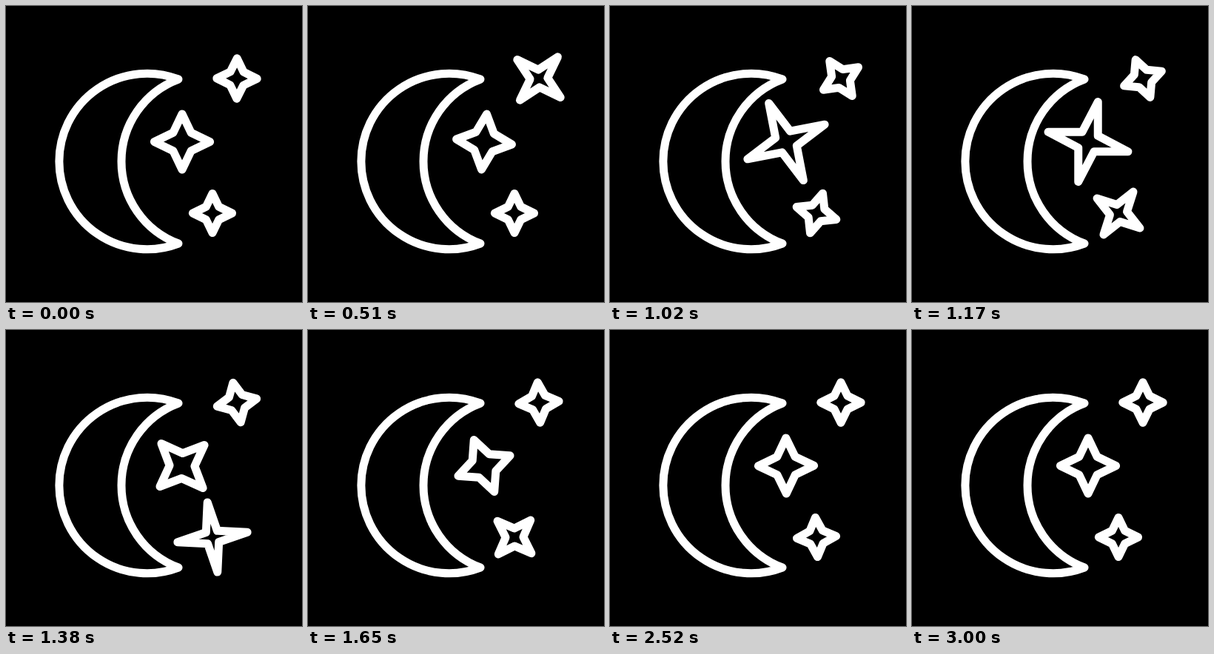
An HTML page for the animation above (5.09 s loop, 400 by 400 pixels).

```html
<!DOCTYPE html>
<html lang="en">
<head>
<meta charset="utf-8">
<title>Moon and stars</title>
<style>
  html, body { margin: 0; width: 100%; height: 100%; overflow: hidden; background: #000; }
  svg { display: block; width: 100%; height: 100%; }
  path { fill: none; stroke: #fff; stroke-width: 11; stroke-linejoin: round; stroke-linecap: round; }
</style>
</head>
<body>
<svg viewBox="0 0 400 400">
  <path d="M233 99A118.8 118.8 0 1 0 233 321A118.5 118.5 0 0 1 233 99Z"/>
  <g id="stars"></g>
</svg>
<script>
  const LOOP = 5090;
  const STRETCH = 21;
  const PEAK = 0.326;
  const SPREAD = 0.066;

  // Times in ms; tip and waist describe the resting outline.
  const stars = [
    { x: 312, y: 98, tip: 27.2, waist: 9, start: -30, length: 2130 },
    { x: 238, y: 183.5, tip: 37.6, waist: 12.2, start: 300, length: 2400 },
    { x: 279, y: 280, tip: 26.6, waist: 8.7, start: 600, length: 2400 },
  ];

  const group = document.getElementById('stars');
  for (const star of stars) {
    star.node = document.createElementNS('http://www.w3.org/2000/svg', 'path');
    group.append(star.node);
  }

  const bezier = (a, b, t) => 3 * a * t * (1 - t) ** 2 + 3 * b * t * t * (1 - t) + t ** 3;

  function ease(x) {
    let low = 0, high = 1;
    for (let i = 0; i < 24; i++) {
      const mid = (low + high) / 2;
      if (bezier(0.5, 0.1, mid) < x) low = mid;
      else high = mid;
    }
    return bezier(0.1, 1, low);
  }

  function outline(tip, waist) {
    return `M0 ${-tip}L${waist} ${-waist} ${tip} 0 ${waist} ${waist}` +
      ` 0 ${tip} ${-waist} ${waist} ${-tip} 0 ${-waist} ${-waist}Z`;
  }

  function draw(now) {
    const time = now % LOOP;
    for (const { node, x, y, tip, waist, start, length } of stars) {
      const progress = Math.min(1, Math.max(0, (time - start) / length));
      const pulse = Math.exp(-(((progress - PEAK) / SPREAD) ** 2) / 2);
      node.setAttribute('d', outline(tip + STRETCH * pulse, waist * (1 - 0.12 * pulse)));
      node.setAttribute('transform', `translate(${x} ${y}) rotate(${180 * ease(progress)})`);
    }
  }

  const origin = performance.now();
  function tick() {
    draw(performance.now() - origin);
    requestAnimationFrame(tick);
  }
  tick();
</script>
</body>
</html>
```
